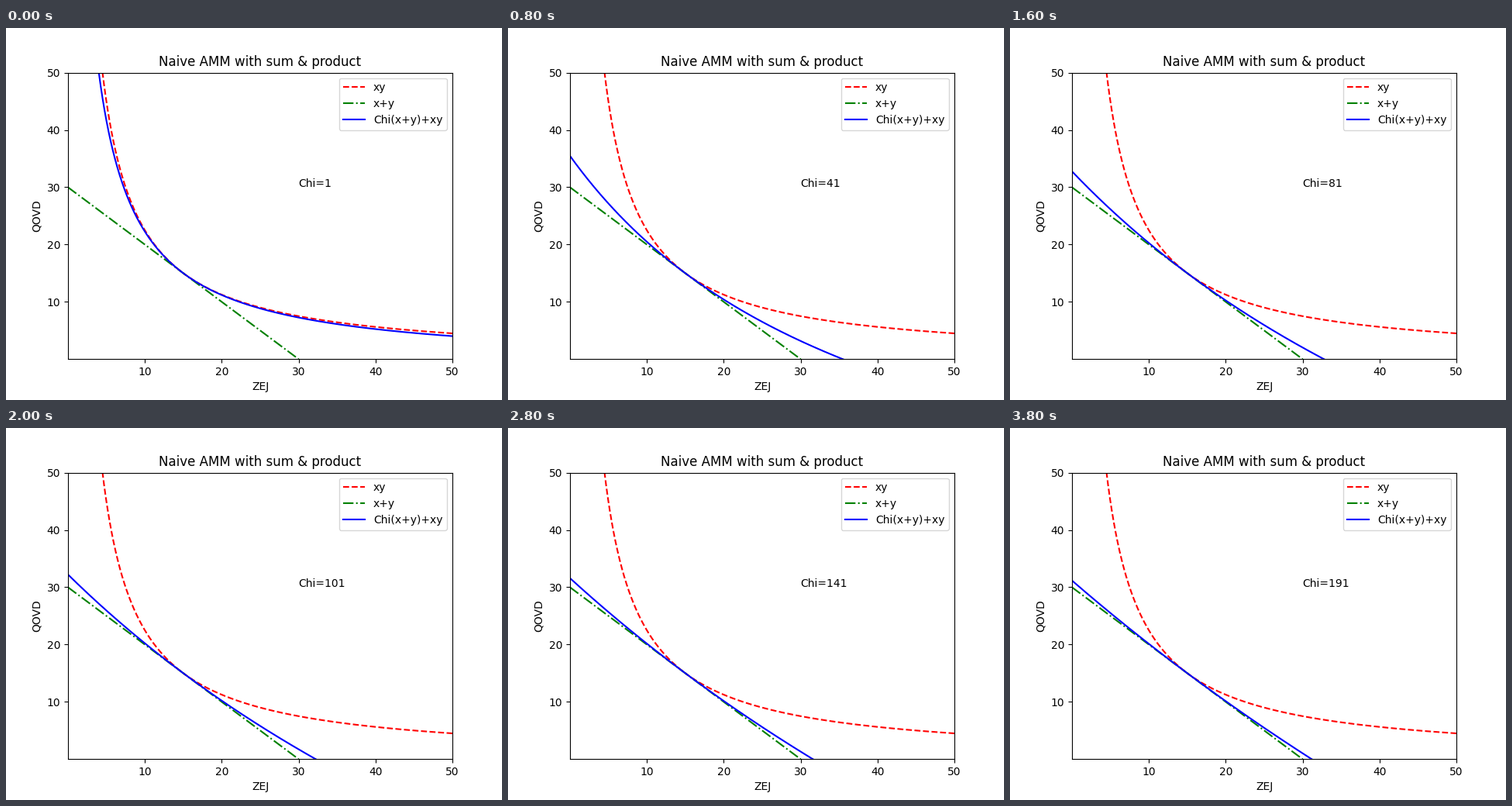
Animation, 640 px wide and 480 px high, one loop 4 s. Source, as a matplotlib script:

```python
import numpy as np
import matplotlib.pyplot as plt
from matplotlib.animation import FuncAnimation

FRAMES = 20
INTERVAL = 200
LOW, HIGH = 0.01, 50
MID = 15  # all curves touch at (MID, MID)

x = np.linspace(LOW, HIGH, 2000)


def mixed(chi):
    """Solve chi * (x + y) + x * y = chi * 2 * MID + MID ** 2 for y."""
    return (chi * (2 * MID - x) + MID ** 2) / (chi + x)


def visible(y):
    inside = (y >= LOW - 0.05) & (y <= HIGH + 0.2)
    return x[inside], y[inside]


fig, ax = plt.subplots(figsize=(6.4, 4.8), dpi=100)
ax.plot(*visible(MID ** 2 / x), color="red", ls="--", label="xy")
ax.plot(*visible(2 * MID - x), color="green", ls="-.", label="x+y")
curve, = ax.plot([], [], color="blue", label="Chi(x+y)+xy")
label = ax.text(30, 30, "")

ax.set(xlim=(LOW, HIGH), ylim=(LOW, HIGH),
       xticks=range(10, 51, 10), yticks=range(10, 51, 10),
       xlabel="ZEJ", ylabel="QOVD",
       title="Naive AMM with sum & product")
ax.legend(loc="upper right")


def update(i):
    chi = 1 + 10 * i
    curve.set_data(*visible(mixed(chi)))
    label.set_text(f"Chi={chi}")
    return curve, label


anim = FuncAnimation(fig, update, frames=FRAMES, interval=INTERVAL,
                     repeat=True, repeat_delay=0)
plt.show()
```
